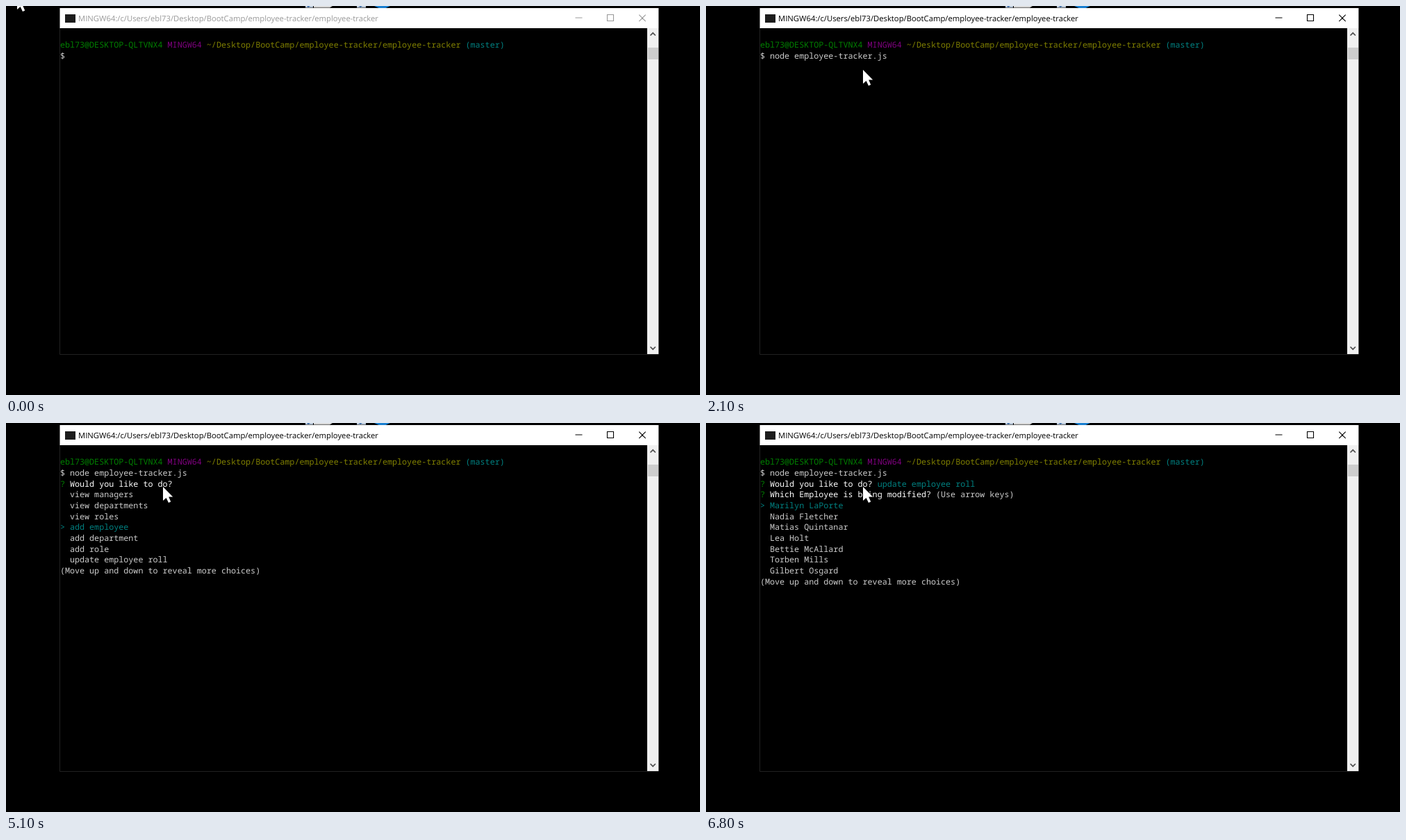
An HTML page for the animation above (8 s loop, 999 px wide and 561 px high).

```html
<!DOCTYPE html>
<html lang="en">
<head>
<meta charset="utf-8">
<title>Employee tracker</title>
<style>
  html, body { margin: 0; width: 100%; height: 100%; overflow: hidden; background: #000; }
  svg { display: block; width: 999px; height: 561px; }
  text { white-space: pre; text-rendering: geometricPrecision; }
  #lines { font: 500 11.735px "Noto Sans Mono", monospace; fill: #ccc; }
  #title { font: 11.27px "Open Sans", sans-serif; }
  .green { fill: #008000; }
  .purple { fill: #800080; }
  .olive { fill: #808000; }
  .teal { fill: #008080; }
  .white { fill: #fff; }
</style>
</head>
<body>
<svg viewBox="0 0 999 561">
  <!-- desktop icons peeking out above the window -->
  <path d="M431 0h11v2.6h-11zM505 0h13v2.6h-13z" fill="#bccada"/>
  <path d="M433 0h5l-3 2zM508 0h5l-3 2z" fill="#2c5f9e"/>
  <path d="M443 0H470L466 2.6H443z" fill="#d6d6d6"/>
  <path d="M530 0H553Q542 7 530 0z" fill="#1a7fd0"/>

  <path d="M77.5 32V502.5H939.4" fill="none" stroke="#222"/>
  <rect x="77.5" y="3" width="861.9" height="29" fill="#fff"/>
  <rect x="85" y="12" width="15" height="12" fill="#1c1c1c"/>
  <g id="chrome">
    <text id="title" x="104" y="22">MINGW64:/c/Users/ebl73/Desktop/BootCamp/employee-tracker/employee-tracker</text>
    <path d="M819.5 17H829.5M865.5 12.5h9v9h-9zM911.3 12.7l9.4 9.4m0-9.4l-9.4 9.4" fill="none" stroke="currentColor" stroke-width="1.1"/>
  </g>
  <rect x="923" y="32" width="16.4" height="470" fill="#f0f0f0"/>
  <rect x="924" y="60" width="15" height="17" fill="#cdcdcd"/>
  <path d="M927.5 42.5l3.7-3.7 3.7 3.7M927.5 491.5l3.7 3.7 3.7-3.7" fill="none" stroke="#505050" stroke-width="1.7"/>

  <g id="lines"></g>
  <path id="pointer" d="M0 0V20L4.6 16L8 23L11.2 21.6L8.2 14.5H14.2z" fill="#fff" stroke="#000" paint-order="stroke"/>
</svg>
<script>
const LOOP = 8000;
const $ = id => document.getElementById(id);
const paint = (cls, s) => `<tspan class="${cls}">${s}</tspan>`;

const PROMPT = paint("green", "ebl73@DESKTOP-QLTVNX4") + " " + paint("purple", "MINGW64") + " " +
  paint("olive", "~/Desktop/BootCamp/employee-tracker/employee-tracker") + " " + paint("teal", "(master)");
const CHOICES = ["view employees", "view managers", "view departments", "view roles", "add employee",
  "add department", "add role", "update employee roll", "EXIT"];
const PEOPLE = ["Marilyn LaPorte", "Nadia Fletcher", "Matias Quintanar", "Lea Holt",
  "Bettie McAllard", "Torben Mills", "Gilbert Osgard"];
const HINT = " (Use arrow keys)";

const ask = (question, tail) => paint("green", "?") + " " + paint("white", question) + tail;

// Seven visible rows; the selection moves down to the fourth, then the list scrolls.
function menu(items, selected) {
  const first = Math.max(0, selected - 3);
  const rows = Array.from({ length: 7 }, (_, i) => {
    const label = items[(first + i) % items.length];
    return first + i === selected ? paint("teal", "&gt; " + label) : "  " + label;
  });
  return [...rows, "(Move up and down to reveal more choices)"];
}

const choose = n => [ask("Would you like to do?", n ? "" : HINT), ...menu(CHOICES, n)];
const people = () => [
  ask("Would you like to do?", " " + paint("teal", CHOICES[7])),
  ask("Which Employee is being modified?", HINT),
  ...menu(PEOPLE, 0)
];

// [start, typed command, output below it]; the menu is briefly erased between some redraws
const RUN = "node employee-tracker.js";
const STATES = [
  [0, "", []],
  [1800, "clear", []],
  [2100, RUN, []],
  [3400, RUN, choose(0)],
  [4500, RUN, choose(1)],
  [4700, RUN, choose(2)],
  [4900, RUN, choose(3)],
  [5000, RUN, []],
  [5100, RUN, choose(4)],
  [5200, RUN, []],
  [5300, RUN, choose(5)],
  [5700, RUN, choose(6)],
  [6000, RUN, choose(7)],
  [6800, RUN, people()]
];

let shown;
function showTerminal(t) {
  const state = STATES.findLast(s => s[0] <= t);
  if (state === shown) return;
  shown = state;
  const [, command, output] = state;
  $("lines").innerHTML = [PROMPT, "$ " + command, ...output]
    .map((s, i) => `<text x="77.9" y="${60.3 + 15.67 * i}">${s}</text>`).join("");
}

// Seven 100 ms steps; the hand dips below the resting point before settling.
function movePointer(t) {
  const p = Math.min(7, Math.max(0, Math.floor(t / 100) - 2)) / 7;
  const q = p - 1, back = 2.6;
  const x = 16 + 210 * (1 - q * q);
  const y = -15 + 107 * (1 + (back + 1) * q ** 3 + back * q * q);
  $("pointer").setAttribute("transform", `translate(${x} ${y})`);
}

function frame() {
  const t = performance.now() % LOOP;
  const color = t < 1100 ? "#999" : "#000";
  $("chrome").style.color = $("chrome").style.fill = color;
  showTerminal(t);
  movePointer(t);
  requestAnimationFrame(frame);
}
frame();
</script>
</body>
</html>
```
